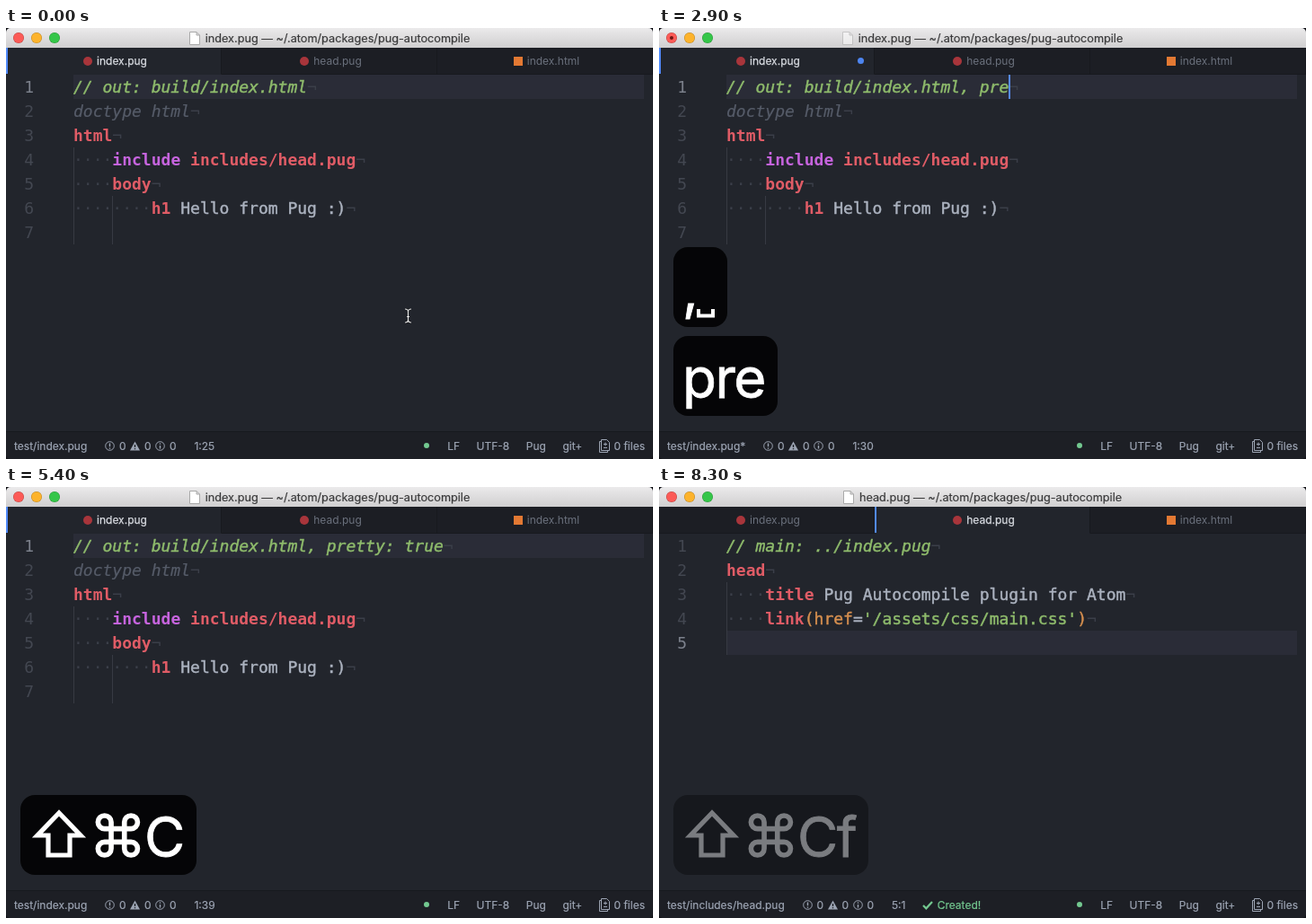
These frames come from a looping animation (720x480 px, 8.4 s). An HTML page:

```html
<!DOCTYPE html>
<html lang="en">
<head>
<meta charset="utf-8">
<title>Pug autocompile</title>
<style>
  html, body { margin: 0; width: 100%; height: 100%; overflow: hidden; background: #111216; }
  #stage { position: relative; width: 720px; height: 480px; overflow: hidden; border-radius: 5px;
    background: #22252c; font: 12px Inter, sans-serif; white-space: pre; }
  #stage > * { position: absolute; }
  i { font-style: normal; }

  .title { left: 0; top: 0; width: 720px; height: 22px; display: flex; align-items: center; justify-content: center;
    gap: 6px; font-size: 12.7px; color: #3a3a3b; background: linear-gradient(#ebeaeb, #d0cfd0);
    -webkit-text-stroke: .2px; }
  .light { top: 5px; width: 12px; height: 12px; border-radius: 50%; }
  .light.edited::after { content: ""; position: absolute; left: 4px; top: 4px; width: 4px; height: 4px;
    border-radius: 50%; background: #6e1512; }
  .logo { width: 10px; height: 10px; margin: 0 1px; }
  .round { border-radius: 50%; }

  .tab { top: 22px; width: 240px; height: 30px; box-sizing: border-box; padding-left: 3px; display: flex;
    align-items: center; justify-content: center; gap: 4px; color: #6b717d; background: #1c1e24;
    border-right: 1px solid #17191e; border-bottom: 1px solid #17191e; }
  .tab.active { color: #d7dae0; -webkit-text-stroke: .25px; background: #22252c; border-bottom-color: #22252c;
    box-shadow: inset 2px 0 #528bff; }
  .dot { position: absolute; left: 221px; top: 11px; width: 7px; height: 7px; border-radius: 50%; background: #4d85f0; }
  .close { position: absolute; left: 221px; top: 11px; }

  .code, .num { font: 18px/27px "DejaVu Sans Mono", monospace; height: 27px; }
  .code { left: 75px; color: #abb2bf; -webkit-text-stroke: .45px; }
  .num { left: 0; width: 31px; text-align: right; color: #434751; }
  .num.active { color: #7c818c; }
  .row { left: 75px; width: 635px; height: 27px; background: #2a2c37; }
  .guide { width: 1px; background: #373a43; }
  .caret { width: 2px; height: 27px; background: #568af2; }
  .r, .p { font-weight: bold; -webkit-text-stroke: 0; }
  .r { color: #e05c66; } .p { color: #c664de; } .o { color: #d68f4f; } .s { color: #8fbc6c; }
  .g { color: #8fbc6c; font-style: italic; } .c { color: #565c69; font-style: italic; -webkit-text-stroke: .2px; }
  .d { color: #3b3f49; -webkit-text-stroke: 0; }

  .status { left: 0; top: 449px; width: 720px; height: 31px; box-sizing: border-box; padding: 0 9px;
    display: flex; align-items: center; color: #9da5b4; background: #1d1f25; border-top: 1px solid #17191e;
    -webkit-text-stroke: .2px; }
  .status > * { margin-right: 18.5px; }
  .status > :nth-child(-n+2) { margin-right: 20px; }
  .status > :last-child { margin-right: 0; }
  .group { display: flex; align-items: center; gap: 4.7px; }
  .created { color: #73c990; }
  .status > .ready { width: 6px; height: 6px; border-radius: 50%; background: #73c990; margin-left: auto; margin-right: 20px; }

  .keys { left: 16px; bottom: 48px; display: flex; flex-direction: column; align-items: flex-start; gap: 10px; }
  .bubble { display: flex; height: 89px; padding: 0 14px 0 10px; border-radius: 16px; color: #fff; background: rgba(0,0,0,.85);
    font-size: 62px; line-height: 93px; letter-spacing: -1.5px; -webkit-text-stroke: .8px; }
  svg { fill: none; stroke: currentColor; flex: none; overflow: visible; }
</style>
</head>
<body>
<div id="stage"></div>
<script>
const LOOP = 8400, STEP = 100, CHAR = 10.836, LINE = 27, LEFT = 75, TOP = 52;
const stage = document.getElementById('stage');

// [x text] colours a run with class x
const files = {
  'index.pug': {
    path: 'test/index.pug', type: 'Pug', row: 1, col: 25, guides: [[0, 4, 4], [4, 6, 2]],
    lines: ['[g // out: build/index.html]', '[c doctype html]', '[r html]',
      '    [p include] [r includes/head.pug]', '    [r body]', '        [r h1] Hello from Pug :)', '']
  },
  'head.pug': {
    path: 'test/includes/head.pug', type: 'Pug', row: 5, col: 1, guides: [[0, 3, 3]],
    lines: ['[g // main: ../index.pug]', '[r head]', '    [r title] Pug Autocompile plugin for Atom',
      "    [r link][o (href]=[s '/assets/css/main.css'][o )]", '']
  },
  'index.html': {
    path: 'test/build/index.html', type: 'HTML', row: 13, col: 8, guides: [[0, 3, 9], [4, 5, 2], [4, 10, 1]],
    lines: ['<!DOCTYPE html>', '<[r html]>', '', '    <[r head]>',
      '        <[r title]>Pug Autocompile plugin for Atom</[r title]>',
      '        <[r link] [o href]=[s "/assets/css/main.css"]>', '    </[r head]>', '', '    <[r body]>',
      '        <[r h1]>Hello from Pug :)</[r h1]>', '    </[r body]>', '', '</[r html]>']
  }
};
const names = Object.keys(files);

// Timeline
const SAVE = 4200;
const typed = ', pretty: true';
const typing = [2300, 2400, 2700, 2800, 2900, 3000, 3100, 3200, 3400, 3500, 3600, 3700, 3900, 4000];
const switches = [[0, 0], [600, 1], [1400, 0], [5900, 2], [6700, 1]];
const blinks = [300, 1000, 1400, 1500, 1900, 4400, 4800, 5200, 5600, 6300, 6700, 7800];
const created = [[5700, 6900], [8000, LOOP]];
const bubbles = [
  { keys: [',', '␣'], times: typing.slice(0, 2) },
  { keys: [...'pretty:', '⇧␣', ...'true'], times: typing.slice(2) },
  { keys: ['⌘S'], times: [SAVE] },
  { keys: ['⇧⌘C', 'f'], times: [5400, 5500] },
  { keys: ['⇧⌘C', 'f'], times: [7500, 7600] }
];
const moves = [[0, 447, 320], [150, 447, 320], [550, 369, 37], [950, 369, 37], [1300, 128, 37], [1450, 128, 37],
  [1900, 348, 263], [5500, 348, 263], [5850, 572, 35], [6350, 572, 35], [6650, 369, 35], [6750, 369, 35], [7200, 405, 267]];

const svg = (w, h, body) => `<svg width="${w}" height="${h}">${body}</svg>`;
const box = (cls, x, y, style = '', body = '') => `<div class="${cls}" style="left:${x}px;top:${y}px;${style}">${body}</div>`;
const passed = (times, t) => times.filter(s => s <= t).length;
const within = (ranges, t) => ranges.some(([a, b]) => t >= a && t < b);

const glyphs = {
  '⇧': svg(66, 89, '<path d="M33 20L9 45H21V67H45V45H57Z" stroke-width="5.2"/>'),
  '⌘': svg(62, 89, '<path transform="translate(3 15.6) scale(2.45)" stroke-width="2.3" d="M18 3a3 3 0 0 0-3 3v12a3 3 0 1 0 3-3H6a3 3 0 1 0 3 3V6a3 3 0 1 0-3 3h12a3 3 0 0 0 0-6"/>'),
  '␣': svg(20, 89, '<path d="M2 69V76.5H18V69" stroke-width="4"/>')
};
const icons = {
  alert: svg(11, 11, '<circle cx="5.5" cy="5.5" r="4.8"/><path d="M5.5 2.5V6.3M5.5 7.4V8.7" stroke-width="1.4"/>'),
  warn: svg(11, 11, '<path d="M5.5 .5L11 10.5H0Z" fill="currentColor" stroke="none"/><path d="M5.5 4V7M5.5 8V9.3" stroke="#1d1f25" stroke-width="1.4"/>'),
  info: svg(11, 11, '<circle cx="5.5" cy="5.5" r="4.8"/><path d="M5.5 2.6V3.8M5.5 5V8.5" stroke-width="1.4"/>'),
  check: svg(12, 11, '<path d="M1 6L4.3 9.3L11 2" stroke-width="2.2"/>'),
  diff: svg(12, 15, '<path d="M2.5 2.5H.5V14.5H9.5V13M2.5 .5H8.5L11.5 3.5V12.5H2.5ZM7 3.5V7.5M5 5.5H9M5 9.5H9"/>'),
  close: svg(8, 8, '<path d="M.8 .8L7.2 7.2M7.2 .8L.8 7.2" stroke-width="1.8"/>'),
  page: svg(12, 15, '<path d="M.5 .5H8L11.5 4V14.5H.5ZM8 .5V4H11.5" fill="#fff" stroke="#a9a9a9"/>')
};
const logo = name => name.endsWith('pug')
  ? '<i class="logo round" style="background:#a8353b"></i>'
  : '<i class="logo" style="background:#e37933"></i>';

function mouseAt(t) {
  const k = Math.max(1, moves.findIndex(m => m[0] >= t));
  if (t >= moves[moves.length - 1][0]) return moves[moves.length - 1].slice(1);
  const [t0, x0, y0] = moves[k - 1], [t1, x1, y1] = moves[k];
  const u = (t - t0) / (t1 - t0), e = u * u * (3 - 2 * u);
  return [x0 + (x1 - x0) * e, y0 + (y1 - y0) * e];
}

function mouse([x, y]) {
  if (y < TOP) return box('', x, y, 'height:18px',
    svg(12, 18, '<path d="M.5 .5V14L3.7 11L6 16.4L8.3 15.4L6 10.2H10.3Z" fill="#111" stroke="#fff"/>'));
  const beam = 'M1 1Q4.5 1 4.5 4V13Q4.5 16 1 16M8 1Q4.5 1 4.5 4M4.5 13Q4.5 16 8 16M3 9.5H6';
  return box('', x - 4.5, y - 8.5, 'height:17px',
    svg(9, 17, `<path d="${beam}" stroke="#15171b" stroke-width="2.6"/><path d="${beam}" stroke="#e8e8e8" stroke-width="1.2"/>`));
}

function titleBar(name, edited) {
  const icon = name === 'index.html'
    ? '<i class="round" style="width:12px;height:12px;background:#e0662f"></i>'
    : `<i style="display:flex;opacity:${edited ? .5 : 1}">${icons.page}</i>`;
  const lights = ['#fc5b57', '#fdb32c', '#35c649'].map((c, k) =>
    `<div class="light ${edited && !k ? 'edited' : ''}" style="left:${8 + 20 * k}px;background:${c};box-shadow:inset 0 0 0 .5px #0004"></div>`);
  return `<div class="title">${icon}<span>${name} — ~/.atom/packages/pug-autocompile</span></div>${lights.join('')}`;
}

function tabs(active, edited, pointer) {
  return names.map((name, k) => {
    const hover = pointer && pointer[1] > 22 && pointer[1] < TOP && Math.floor(pointer[0] / 240) === k;
    const mark = edited && !k ? '<i class="dot"></i>' : hover ? `<i class="close" style="line-height:0">${icons.close}</i>` : '';
    return box('tab' + (k === active ? ' active' : ''), 240 * k, 22, '', `${logo(name)}<span>${name}</span>${mark}`);
  }).join('');
}

function markup(line, last) {
  return line.replace(/</g, '&lt;')
    .replace(/^ +/, s => `<i class="d">${'·'.repeat(s.length)}</i>`)
    .replace(/\[(\w) ([^\]]*)\]/g, '<i class="$1">$2</i>') + (last ? '' : '<i class="d">¬</i>');
}

function editor(file, col, extra, caretOn) {
  const y = row => TOP + LINE * (row - 1);
  let out = box('row', LEFT, y(file.row));
  for (const [c, row, count] of file.guides)
    out += box('guide', Math.floor(LEFT + c * CHAR), y(row), `height:${count * LINE}px`);
  file.lines.forEach((line, k) => {
    const text = extra && !k ? line.replace(']', extra + ']') : line;
    out += box('num' + (k + 1 === file.row ? ' active' : ''), 0, y(k + 1), '', k + 1);
    out += box('code', LEFT, y(k + 1), '', markup(text, k === file.lines.length - 1));
  });
  return out + (caretOn ? box('caret', Math.round(LEFT + (col - 1) * CHAR), y(file.row)) : '');
}

function statusBar(file, col, edited, done) {
  return `<div class="status"><span>${file.path}${edited ? '*' : ''}</span>
<span class="group">${icons.alert}<i>0</i>${icons.warn}<i>0</i>${icons.info}<i>0</i></span>
<span>${file.row}:${col}</span>${done ? `<span class="group created">${icons.check}<i>Created!</i></span>` : ''}
<i class="ready"></i><span>LF</span><span>UTF-8</span><span>${file.type}</span><span>git+</span>
<span class="group">${icons.diff}<i>0 files</i></span></div>`;
}

function keyBubbles(t) {
  return '<div class="keys">' + bubbles.map(({ keys, times }) => {
    const n = passed(times, t);
    const alpha = Math.min(1, 1 - (t - times[n - 1] - 550) / 250);
    if (!n || alpha <= 0) return '';
    const text = keys.slice(0, n).join('').replace(/[⇧⌘␣]/g, c => glyphs[c]);
    return `<div class="bubble" style="opacity:${alpha.toFixed(2)}">${text}</div>`;
  }).join('') + '</div>';
}

function scene(t) {
  const active = switches.filter(s => s[0] <= t).pop()[1];
  const name = names[active], file = files[name];
  const extra = active === 0 ? typed.slice(0, passed(typing, t)) : '';
  const edited = t >= typing[0] && t < SAVE;
  const col = file.col + extra.length;
  const hidden = within([[typing[0], 5550], [7500, LOOP]], t);
  const pointer = hidden ? null : mouseAt(t);
  return titleBar(name, edited) + tabs(active, edited, pointer)
    + editor(file, col, extra, passed(blinks, t) % 2)
    + statusBar(file, col, edited, within(created, t))
    + keyBubbles(t) + (pointer ? mouse(pointer) : '');
}

let shown = -1;
function tick() {
  const t = Math.floor(performance.now() % LOOP / STEP) * STEP;
  if (t !== shown) stage.innerHTML = scene(shown = t);
  requestAnimationFrame(tick);
}
tick();
</script>
</body>
</html>
```
